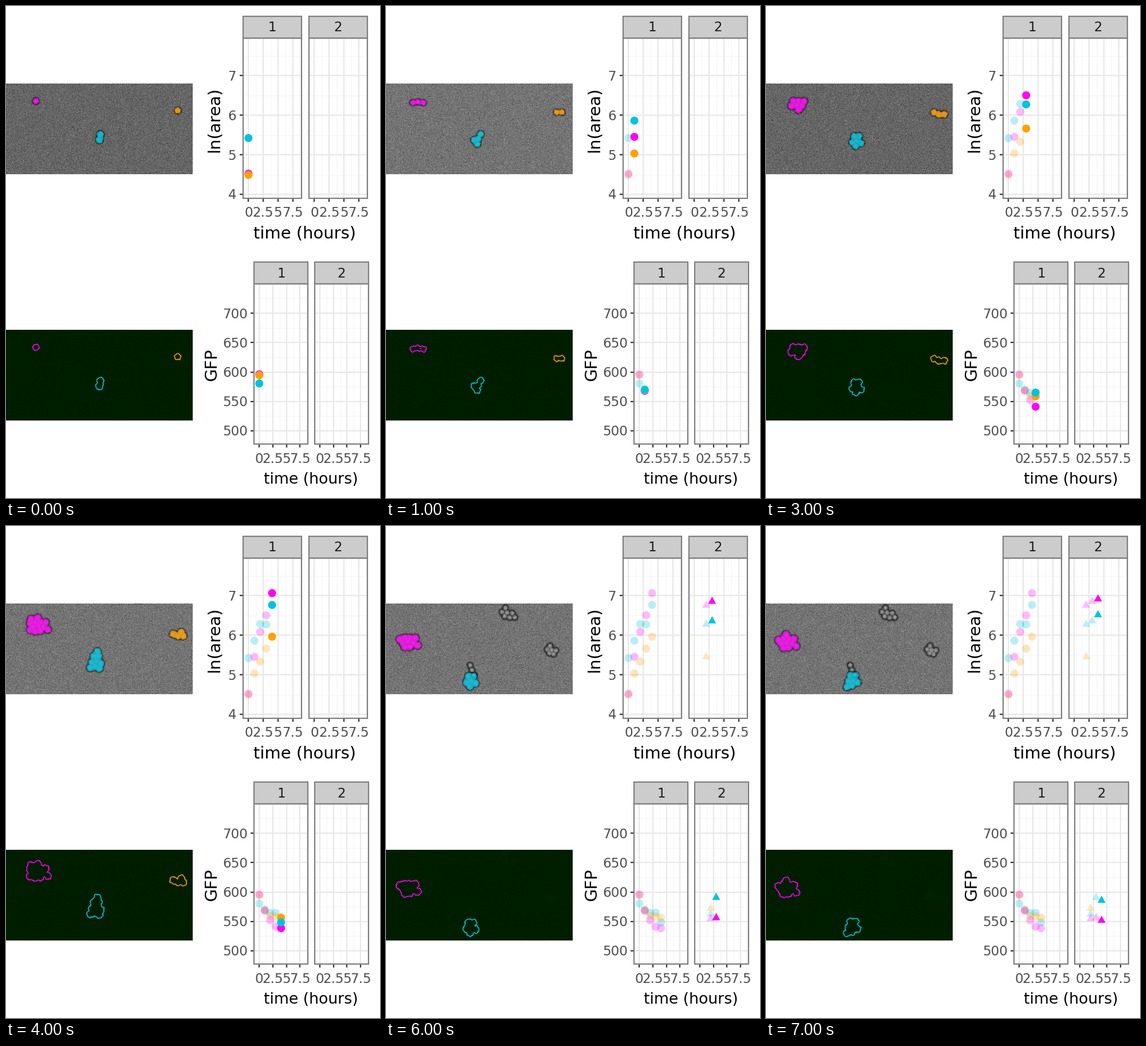
Recreate the animation shown at these times as a matplotlib script. Size 653x857 px, loop 8000 ms.

```python
import numpy as np
import matplotlib.pyplot as plt
from matplotlib.animation import FuncAnimation
from matplotlib.colors import to_rgb
from matplotlib.patches import Circle, Polygon, Rectangle

W, H, DPI = 653, 857, 64
PX = 72 / DPI                      # points per pixel
IMG_W, IMG_H = 326, 158
IMG_TOP, GFP_TOP = 135, 564
STEPS, SWITCH = 8, 5               # the second facet starts at SWITCH
MAGENTA, ORANGE, CYAN = "#ff00f8", "#ffa000", "#00c3e0"

plt.rcParams["font.family"] = "DejaVu Sans"
fig = plt.figure(figsize=(W / DPI, H / DPI), dpi=DPI, facecolor="white")
ax = fig.add_axes([0, 0, 1, 1])
ax.axis("off")


# ---------- charts ----------
def text(x, y, s, size, color, ha="center", rotation=0):
    ax.text(x, y, s, fontsize=size * PX, color=color, ha=ha, va="baseline",
            rotation=rotation, rotation_mode="anchor", zorder=6)


def line(xs, ys, color, width, z):
    ax.plot(xs, ys, color=color, lw=width * PX, solid_capstyle="butt", zorder=z)


def box(x0, y0, x1, y1, face):
    ax.add_patch(Rectangle((x0, y0), x1 - x0, y1 - y0, facecolor=face,
                           edgecolor="#7f7f7f", lw=2.2 * PX, zorder=5))


class Chart:
    """Two facets sharing one value axis."""

    def __init__(self, top, left, width, gap, hour, y_of, majors):
        self.hour, self.y_of = hour, y_of
        lefts = (left, left + width + gap)
        self.zeros = [x + 0.094 * width for x in lefts]
        head, base = top + 38, top + 317
        half = (majors[1] - majors[0]) / 2
        for name, x0, zero in zip("12", lefts, self.zeros):
            x1 = x0 + width
            for v in majors:
                for value, color, lw, z in ((v + half, "#f5f5f5", 1.1, 1),
                                            (v, "#e8e8e8", 2.2, 2)):
                    line([x0, x1], [y_of(value)] * 2, color, lw, z)
            for t in np.arange(0, 10, 2.5):
                x, mid = zero + hour * t, zero + hour * (t + 1.25)
                line([mid, mid], [head, base], "#f5f5f5", 1.1, 1)
                line([x, x], [head, base], "#e8e8e8", 2.2, 2)
                line([x, x], [base, base + 6], "#333333", 2.2, 4)
                text(x, base + 32.3, f"{t:g}", 23, "#4d4d4d")
            box(x0, top, x1, head, "#cccccc")
            box(x0, head, x1, base, "none")
            text((x0 + x1) / 2, top + 26.5, name, 23, "#1a1a1a")
        for v in majors:
            line([left - 6, left], [y_of(v)] * 2, "#333333", 2.2, 4)
            text(left - 11.5, y_of(v) + 8.5, f"{v}", 23, "#4d4d4d", ha="right")

    def mark(self, step, value, color):
        late = step >= SWITCH
        t = step - 3 if late else step
        x, y = self.zeros[late] + self.hour * t, self.y_of(value)
        if late:
            shape = Polygon([(x, y - 7), (x + 7, y + 5.6), (x - 7, y + 5.6)])
        else:
            shape = Circle((x, y), 7)
        shape.set(facecolor=color, linewidth=0)
        return ax.add_patch(shape)


area_chart = Chart(17.5, 413.7, 102.3, 12.8, 10.32, lambda v: 328 - 69 * (v - 4),
                   range(4, 8))
gfp_chart = Chart(446.2, 433.4, 94, 11.7, 9.5, lambda v: 637.5 - 1.025 * (v - 600),
                  range(500, 701, 50))
text(522, 404, "time (hours)", 29, "black")
text(532.5, 832.5, "time (hours)", 26.8, "black")
text(371.5, 198, "ln(area)", 29, "black", rotation=90)
text(367, 625, "GFP", 29, "black", rotation=90)


# ---------- colonies ----------
def packing(seed, axis, stretch, count=15):
    """Cell centres of a colony that buds outwards, longer along one axis."""
    rng = np.random.default_rng(seed)
    along, across = [np.array([np.cos(a), np.sin(a)]) for a in (axis, axis + np.pi / 2)]
    pts = [np.zeros(2), 9.5 * along]
    while len(pts) < count:
        best, best_cost = None, np.inf
        for _ in range(30):
            a = rng.uniform(0, 2 * np.pi)
            p = pts[rng.integers(len(pts))] + 9 * np.array([np.cos(a), np.sin(a)])
            cost = np.hypot(p @ along / stretch, p @ across) * rng.uniform(0.85, 1.2)
            if cost < best_cost and min(np.hypot(*(p - q)) for q in pts) > 7.5:
                best, best_cost = p, cost
        if best is not None:
            pts.append(best)
    return np.array(pts)


gx, gy = np.meshgrid(np.arange(IMG_W) + 0.5, np.arange(IMG_H) + IMG_TOP + 0.5)


def field(cells, r):
    """Smooth height inside a union of cells, and the shade within them."""
    total, shade = np.full(gx.shape, 1e-9), np.zeros(gx.shape)
    for x, y in cells:
        dist = np.hypot(gx - x, gy - y)
        total += np.exp(np.minimum(r - dist, 30) / 1.1)
        shade = np.maximum(shade, 1 - (dist / r) ** 2)
    return 1.1 * np.log(total), shade


def place(pts, count, keys, xs, ys, step):
    centre = np.interp(step, keys, xs), np.interp(step, keys, ys)
    return pts[:count] - pts[:count].mean(0) + centre


class Colony:
    KEYS = (0, 1, 4, 5, 7)

    def __init__(self, color, xs, ys, pts, log_area, gfp):
        self.color, self.xs, self.ys, self.pts = color, xs, ys, pts
        self.log_area, self.gfp = log_area, gfp

    def cells(self, step):
        """Cell centres and the radius that gives the plotted area."""
        size = np.exp(self.log_area[step])
        cells = place(self.pts, max(1, round(size / 92)), self.KEYS,
                      self.xs, self.ys, step)
        r = 5.0
        for _ in range(3):
            covered = (field(cells, r)[0] > 0).sum()
            r = np.clip(r * np.sqrt(size / covered), 3.8, 6.6)
        return cells, r


COLONIES = [
    Colony(MAGENTA, (52, 56, 55, 42, 37), (165.5, 168, 173, 202, 202),
           packing(4, 0.15, 1.6),
           (4.52, 5.45, 6.08, 6.50, 7.06, 6.77, 6.87, 6.93),
           (596, 568, 552, 541, 538.5, 556, 557.5, 553)),
    Colony(ORANGE, (300, 302.5, 302, 293, 293), (182, 185, 189, 218, 218),
           packing(2, 0, 1.4),
           (4.49, 5.03, 5.33, 5.66, 5.96, 5.47),
           (594.5, 569, 559.5, 558.5, 556.5, 573.5)),
    Colony(CYAN, (164, 160, 157, 146, 150), (228.5, 232, 236, 270, 270),
           packing(7, 1.75, 1.6),
           (5.42, 5.86, 6.28, 6.27, 6.76, 6.29, 6.375, 6.53),
           (580.5, 570, 564.5, 565, 548.5, 563.5, 592, 587)),
]
CLUMP = packing(3, 1.1, 1.7)


def unmarked(step):
    """Plain cells: a clump drifting in from above, and late neighbours."""
    cells = [place(CLUMP, 7, (2, 3, 4, 5), (220, 220, 223, 213),
                   (108, 118, 123, 153), step)]
    if step >= SWITCH:
        cells += [CLUMP[:6] * 0.85 + (289, 216), CLUMP[:3] + (150, 251)]
    return np.vstack(cells)


def paint(img, color, alpha):
    alpha = np.clip(alpha, 0, 1)[..., None]
    return img * (1 - alpha) + 255 * np.array(to_rgb(color)) * alpha


WAVE = 0.7 * np.sin(gx * 0.75 + gy * 0.3) * np.sin(gy * 0.7 - gx * 0.2)


def render(step):
    """Bright-field photo and fluorescence image at one step."""
    rng = np.random.default_rng(step + 1)
    light = 102 if step in (0, 3) else 116
    bright = light + rng.normal(0, 15, gx.shape)
    green = np.zeros(gx.shape + (3,))
    green[..., 1] = 30 + rng.normal(0, 1.5, gx.shape)

    coloured = [(c.color, *c.cells(step)) for c in COLONIES if step < len(c.log_area)]
    plain = unmarked(step)
    groups = [(plain, 4.7)] + [(cells, r) for _, cells, r in coloured]
    for cells, r in groups:
        d, shade = field(cells, r)
        bright *= 1 - 0.5 * np.exp(-((d + 0.5) / 1.5) ** 2)
        bright += np.where(d > 0, 60 * shade - 28, 0)
    green[..., 1] += np.clip(field(plain, 4.7)[0], 0, 1) * 4
    photo = np.repeat(bright[..., None], 3, axis=2)

    for color, cells, r in coloured:
        height = field(cells, r)[0] + WAVE
        slope = np.hypot(*np.gradient(height))
        edge = height / np.maximum(slope, 0.4)
        photo = paint(photo, color, np.clip(edge + 0.5, 0, 1) * 0.76)
        green = paint(green, color, 1.35 - np.abs(edge))
    return [np.clip(a, 0, 255).astype(np.uint8) for a in (photo, green)]


marks = [(step, rank, chart.mark(step, value, c.color))
         for rank, c in enumerate(COLONIES)
         for chart, values in ((area_chart, c.log_area), (gfp_chart, c.gfp))
         for step, value in enumerate(values)]
images = [render(step) for step in range(STEPS)]
views = [ax.imshow(img, extent=(0, IMG_W, top + IMG_H, top), aspect="auto",
                   interpolation="nearest", zorder=1)
         for img, top in zip(images[0], (IMG_TOP, GFP_TOP))]
ax.set_xlim(0, W)
ax.set_ylim(H, 0)


def draw(step):
    for view, img in zip(views, images[step]):
        view.set_data(img)
    for born, rank, shape in marks:
        now = born == step
        shape.set_visible(born <= step)
        shape.set_alpha(1 if now else 0.27)
        shape.set_zorder(3.5 + 0.1 * rank if now else 3 - 0.1 * rank)
    return views


anim = FuncAnimation(fig, draw, frames=STEPS, init_func=lambda: draw(0),
                     interval=1000, repeat=True, repeat_delay=0, blit=False)
plt.show()
```
